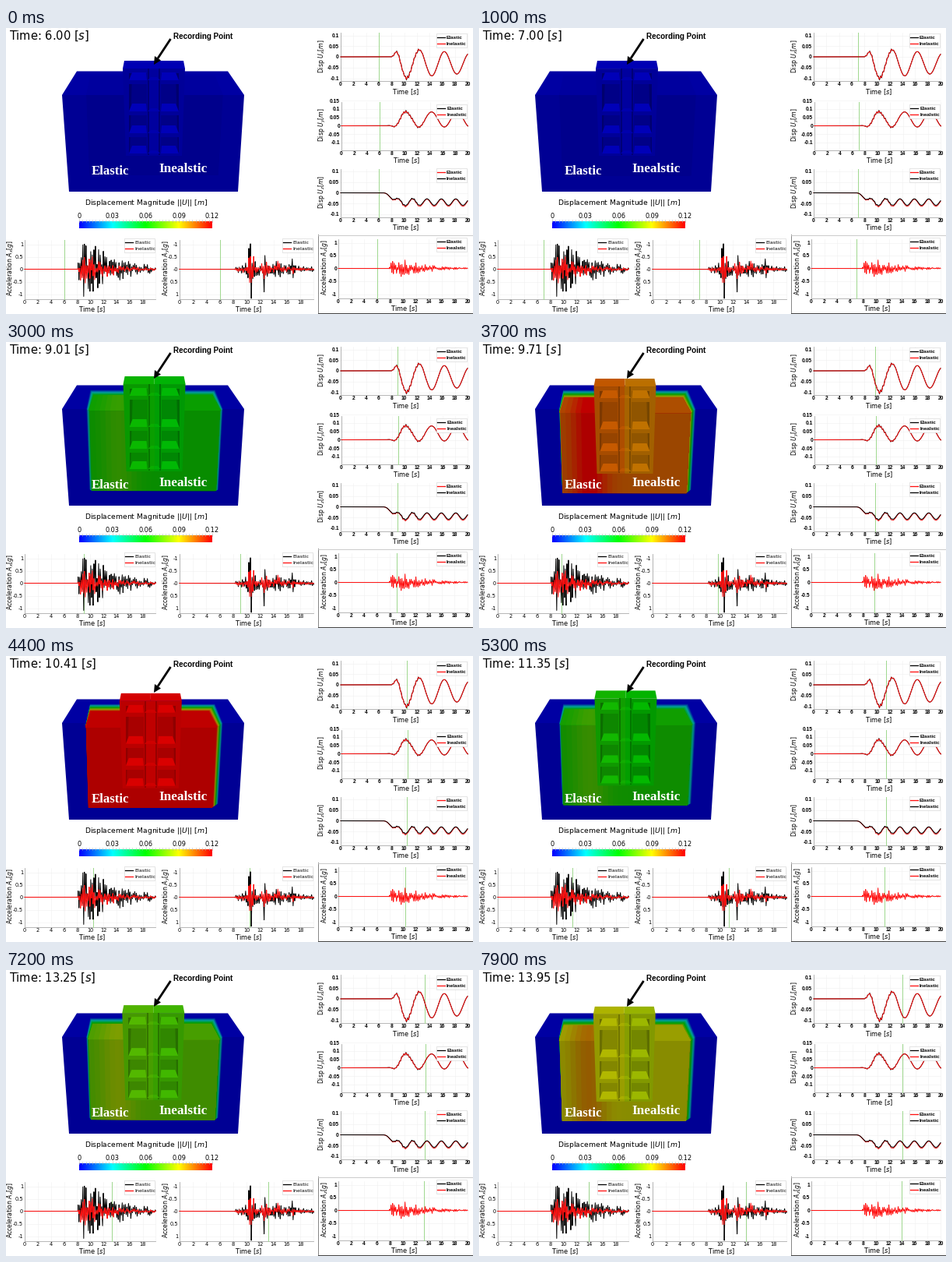
These frames come from a looping animation (600 by 367 pixels, 8000 ms). A matplotlib script:

```python
import numpy as np
import matplotlib.pyplot as plt
from matplotlib.animation import FuncAnimation
from matplotlib.collections import PolyCollection
from matplotlib.patches import Polygon, Rectangle

W, H, DPI = 600, 367, 64
PT = 72 / DPI  # points per pixel
FRAMES, STEP = 80, 100
SANS, BOLD, SERIF = "DejaVu Sans", "Liberation Sans", "Liberation Serif"
BLACK, RED, CURSOR = "#000000", "#ff1010", "#a0d890"

fig = plt.figure(figsize=(W / DPI, H / DPI), dpi=DPI, facecolor="white")
ax = fig.add_axes([0, 0, 1, 1])
ax.axis("off")


def text(x, y, s, size, font=SANS, ha="left", va="baseline", **kw):
    if font != SANS:
        kw.setdefault("weight", "bold")
    return ax.text(x, y, s, fontsize=size * PT, family=font, ha=ha, va=va, **kw)


def line(xs, ys, color, width=1.0, z=2, **kw):
    return ax.plot(xs, ys, color=color, lw=width * PT, zorder=z, **kw)[0]


# ---- motion of the recording point ----
def ramp_up(t, start, end):
    s = np.clip((t - start) / (end - start), 0, 1)
    return s * s * (3 - 2 * s)


def swing(t, peak, period):
    return np.cos(2 * np.pi * (t - peak) / period)


def disp_x(t):
    return ramp_up(t, 8, 9.3) * (.07 * np.exp(-.04 * (t - 10)) * swing(t, 12.4, 3.95) - .03)


def disp_y(t):
    return ramp_up(t, 7, 9.6) * (.038 + .045 * swing(t, 14.25, 4.05))


def disp_z(t):
    return ramp_up(t, 6.6, 9.6) * (.015 * swing(t, 13.6, 2.27) - .043)


MAG = [(7, 0), (7.8, .014), (9, .061), (10, .125), (10.4, .14),
       (11.35, .063), (12, .05), (12.55, .058), (13.95, .089)]

# ---- recorded signals ----
T = np.linspace(0, 20, 1600)


def shake(seed, step=.12):
    """Spiky oscillation with random peak heights in -1..1."""
    rng = np.random.default_rng(seed)
    knots = np.arange(0, 20.2, step)
    peaks = rng.uniform(.1, 1, knots.size) ** 1.4 * (-1) ** np.arange(knots.size)
    return np.interp(T, knots, peaks)


def quake(amp, onset, rise, decay):
    s = np.clip(T - onset, 0, None)
    return amp * (1 - np.exp(-s / rise)) * np.exp(-s / decay)


def burst(center, width):
    return np.exp(-((T - center) / width) ** 2)


rough = .009 * burst(10.4, 2.2) * (T > 8)
ux, uy = disp_x(T) + rough * shake(3, .17), disp_y(T) + rough * shake(5, .17)
uz = disp_z(T) + .6 * rough * shake(7, .2)
other = .6 * rough * shake(9, .17)

ax_el = np.clip(quake(1.7, 8.1, .25, 5) * shake(21), -1.17, 1.2)
ax_in = quake(.9, 8.1, .5, 4.2) * shake(22)
pulses = sum(1.3 * .64 ** k * burst(10.7 + 2 * k, .45) for k in range(4))
ay_env = pulses + quake(.38, 8.2, .8, 9)
ay_el = np.clip(ay_env * shake(31), -1.17, 1.02)
ay_in = .55 * ay_env * shake(34)
az_in = quake(.68, 7.8, .8, 4) * shake(41)

# ---- plots ----
cursors = []


def legend(x, y, rows, font):
    ax.add_patch(Rectangle((x, y - 5), 39, 18, fc="white", ec="#d4d4d4",
                           lw=.6 * PT, zorder=6))
    for i, (name, color) in enumerate(rows):
        line([x + 1, x + 11], [y + 8 * i] * 2, color, 1.3, 7)
        text(x + 13, y + 8 * i + 2.3, name, 6.4, font, zorder=7)


def panel(x0, per_s, zero, reach, scale, ticks, label, label_dx, curves,
          key_y, names, font=BOLD, last=20, flip=1):
    """Time history with its zero line at `zero`, `reach` pixels up and down."""
    px = lambda t: x0 + per_s * t
    py = lambda v: zero - scale * v
    top, bottom, right = zero - reach, zero + reach, px(20)
    for k in range(0, 21, 2):
        line([px(k)] * 2, [top, bottom], "#f1f1f1", .6, 1)
        if k <= last:
            text(px(k), bottom + 6.5, str(k), 6.6, font, "center")
    for v in ticks:
        line([x0, right], [py(v)] * 2, "#f1f1f1", .6, 1)
        text(x0 - 2, py(v) + 2.4, f"{flip * v:g}", 6.6, font, "right")
    line([x0, x0, right], [top, bottom, bottom], "#999999", .7, 1)
    for data, color in curves:
        line(px(T), py(data), color, 1.0, 4, solid_joinstyle="round")
    text((x0 + right) / 2 + 2, bottom + 17, "Time [$\\mathit{s}$]", 8.3, ha="center")
    text(x0 - label_dx, zero - 1, label, 7.7, ha="center", va="center", rotation=90)
    legend(right - 40, key_y, names, font)
    cursors.append((line([x0, x0], [top, bottom], CURSOR, 1, 3), px))


def label(word, symbol, axis, unit):
    return f"{word} $\\mathit{{{symbol}}}_\\mathit{{{axis}}}$[$\\mathit{{{unit}}}$]"


def names(second="Inelastic", colors=(BLACK, RED)):
    return list(zip(("Elastic", second), colors))


HALVES = np.arange(-2, 3) / 2
TENTHS = HALVES / 10
panel(430, 8.15, 37, 31, 275, TENTHS, label("Disp", "U", "x", "m"), 24,
      [(ux + other, BLACK), (ux, RED)], 12, names())
panel(431, 8.12, 125.5, 31, 215, [*TENTHS, .15], label("Disp", "U", "y", "m"), 25,
      [(uy + other, BLACK), (uy, RED)], 102.5, names("Inealstic"))
panel(430, 8.15, 211.5, 31, 275, TENTHS, label("Disp", "U", "z", "m"), 24,
      [(uz * 1.08, RED), (uz, BLACK)], 184.5, names(colors=(RED, BLACK)))
panel(24, 8.42, 309.5, 38, 32, HALVES, label("Acceleration", "A", "x", "g"), 18,
      [(ax_el, BLACK), (ax_in, RED)], 275, names(), SANS, 18)
panel(223, 8.62, 309.5, 38, 32, HALVES, label("Acceleration", "A", "y", "g"), 17,
      [(ay_el, BLACK), (ay_in, RED)], 275, names(), SANS, 18, -1)
panel(427, 8.3, 308.5, 38, 33, HALVES, label("Acceleration", "A", "z", "g"), 18,
      [(az_in, RED)], 274, names("Inealstic"))
line([400.5, 400.5], [265, 366], "#888888", 1, 1)
line([401, 600], [265.5, 265.5], "#cccccc", 1, 1)
line([401, 600], [366, 366], "#444444", 1, 1)

# ---- colour scale ----
def rainbow(s):
    """Blue, cyan, green, yellow, red over 0..1."""
    s = np.asarray(s, float)
    return np.stack([np.clip(4 * s - 2, 0, 1),
                     np.clip(2 - np.abs(4 * s - 2), 0, 1),
                     np.clip(2 - 4 * s, 0, 1)], axis=-1)


ax.imshow(rainbow(np.linspace(0, 1, 172))[None], extent=(94, 265, 257, 248),
          aspect="auto", zorder=2)
ax.set_xlim(0, W)
ax.set_ylim(H, 0)
for k in range(41):
    x = 94 + 171 * k / 40
    line([x, x], [245 if k % 10 == 0 else 246, 249], "#b0b0b0", .6)
for k in range(5):
    text(94 + 42.7 * k, 244, f"{.03 * k:.2g}", 8.3, ha="center")
text(101, 227, "Displacement Magnitude ||$\\mathit{U}$|| [$\\mathit{m}$]", 9.2)


# ---- solid model ----
def quad(x0, x1, y0, x2, x3, y1):
    """Trapezoid from an upper edge x0..x1 to a lower edge x2..x3."""
    return np.array([(x0, y0), (x1, y0), (x3, y1), (x2, y1)], float)


BLOCK = (quad(91, 285, 55.5, 72, 306, 86), .64), (quad(72, 306, 86, 81, 298, 210), .58)
PIT = (quad(103, 279, 86, 107, 273, 189), .55), (quad(108, 269, 61, 103, 279, 86), .62)
INSET = np.array([(4, 0), (-5, 0), (-4, 0), (3, 0)], float)
BACK = np.array([(0, 5), (0, 5), (0, 0), (0, 0)], float)
MID = 190  # axis of symmetry of the building
FLOORS = (67, 107, 135, 161)

solid = PolyCollection([], edgecolors="none", zorder=2)
ax.add_collection(solid, autolim=False)


def shade(mag, light):
    s = min(mag / .12, 1)
    return np.clip(rainbow(s) * (light + .13 * max(0, 5 * s - 4)), 0, 1)


def build(mag, shift):
    """Polygons back to front with their colours."""
    polys, cols = [], []

    def add(pts, m, light, move=0):
        polys.append(pts + move)
        cols.append(shade(m, light))

    for pts, light in BLOCK:
        add(pts, 0, light)

    for i, (pit, light) in enumerate(PIT):
        soil = pit + INSET + i * BACK + shift
        for s in np.linspace(.08, 1, 12):
            add(pit + (soil - pit) * s, mag * s, light)
        a, b, c, d = soil
        for u in np.linspace(0, .96, 25):
            bump = 1 + .14 * np.exp(-((u - .2) / .14) ** 2)
            add(np.array([a + (b - a) * u, b, c, d + (c - d) * u]), mag * bump, light)

    def part(d0, d1, y0, d2, d3, y1, light, sides=(-1, 1)):
        for side in sides:
            pts = quad(d0, d1, y0, d2, d3, y1) * (side, 1) + (MID, 0)
            add(pts, mag * (.98 - .02 * side), light, shift)

    part(0, 38, 42, 0, 40, 52, .7)
    part(0, 40, 52, 0, 36, 164, .6)
    part(9, 32, 58, 9, 32, 161, .53)
    part(28, 32, 58, 31, 32, 161, .43)
    for y in FLOORS:
        part(10, 28, y - 10, 9, 32, y, .72)
        if y < FLOORS[-1]:
            part(9, 32, y, 9, 32, y + 5, .6)
    part(0, 8, 52, 0, 8, 163, .46)
    part(0, 6, 52, 0, 6, 163, .62)
    for y in FLOORS:
        part(0, 4, y - 4, 0, 8, y, .68)
    return polys, cols


# ---- annotations ----
line([211.5, 195], [14, 39], BLACK, 2.8, 5, solid_capstyle="butt")
ax.add_patch(Polygon([(190, 47), (191, 36), (199, 41.5)], fc=BLACK, ec="none", zorder=5))
text(215, 13.5, "Recording Point", 9.85, BOLD)
text(110, 188, "Elastic", 16.7, SERIF, color="white", zorder=5)
text(196, 185, "Inealstic", 17.2, SERIF, color="white", zorder=5)
clock = text(4, 14.5, "", 14.6)


def draw(n):
    t = 6 + .1 * n + .01 * (n >= 24) + .04 * (n >= 48)
    clock.set_text(f"Time: {t:.2f} [$\\mathit{{s}}$]")
    for mark, px in cursors:
        mark.set_xdata([px(t)] * 2)
    shift = np.array([42 * disp_x(t), 45 * disp_y(t) - 40 * disp_z(t)])
    polys, cols = build(np.interp(t, *np.transpose(MAG)), shift)
    solid.set_verts(polys)
    solid.set_facecolor(cols)
    return [clock, solid] + [mark for mark, _ in cursors]


anim = FuncAnimation(fig, draw, frames=FRAMES, interval=STEP, repeat=True,
                     repeat_delay=0, blit=False)
plt.show()
```
